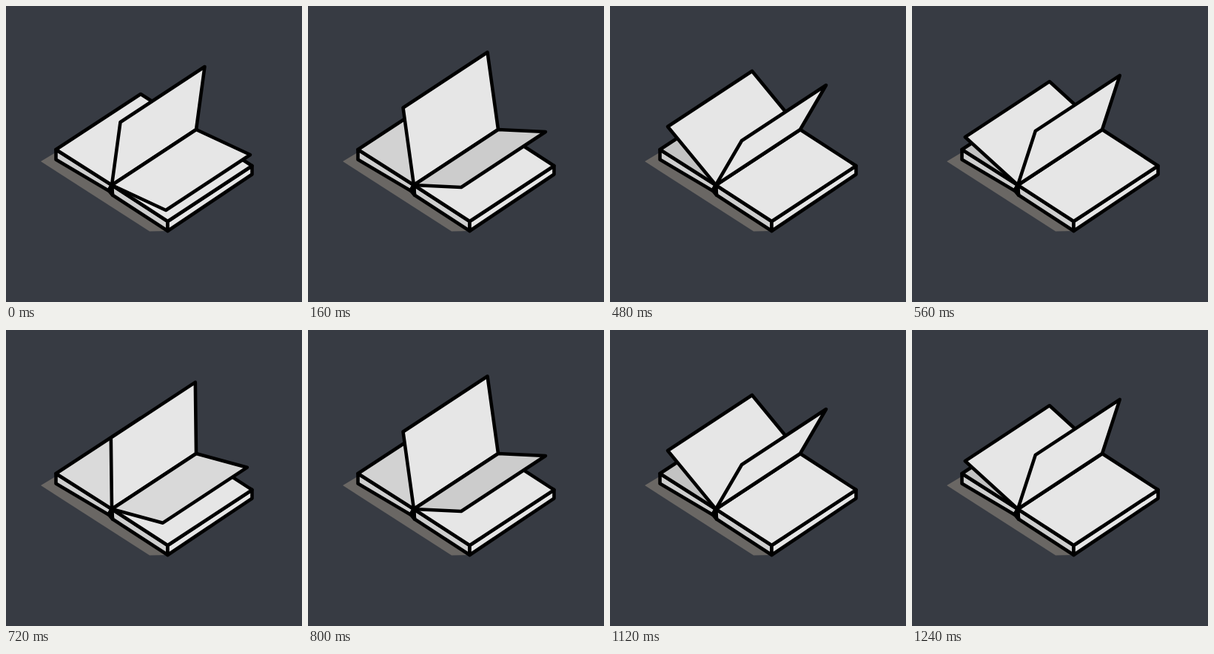
An HTML page for the animation above (1280 ms loop, 400 by 400 pixels).

```html
<!DOCTYPE html>
<html lang="en">
<head>
<meta charset="utf-8">
<title>Flipping book</title>
<style>
  html, body { margin: 0; height: 100%; overflow: hidden; background: #373b43; }
  svg { display: block; width: 100%; height: 100%; }
  .ink { stroke: #000; stroke-width: 4.6; stroke-linejoin: round; fill: #e6e6e6; }
  .side { fill: #cecece; }
</style>
</head>
<body>
<svg viewBox="0 0 400 400">
  <path fill="#6a6764" d="M47 210 67 198 218 304 194 304.500Z"/>
  <g class="ink">
    <path class="side" d="M67.500 194 143 242 138.500 249.500 67.500 207.500Z"/>
    <path class="side" d="M143 242 218.500 291 218.500 304 144 255.500Z"/>
    <path d="M218.500 291 332.500 216 332.500 227.500 218.500 304Z"/>
    <path fill="#000" d="M143 242 138.500 249 144 255.500Z"/>
    <path id="left" d="M67.500 194 182 119 257 167 143 242Z"/>
    <path d="M143 242 257 167 332.500 216 218.500 291Z"/>
    <path id="falling"/>
    <path id="rising"/>
  </g>
</svg>
<script>
const LOOP = 1280, TURN = 640, TICK = 40;

// Free edge relative to the hinge, one point per 160 ms, with one guide point at each end.
const PATH = [
  [78, 64], [73, 34], [64, 3], [52, -30], [35, -60], [11.500, -85],
  [-14.500, -104.500], [-43, -104], [-65, -79], [-75.500, -48], [-81, 0]
];

// Second turn runs with uneven holds, in ticks.
const HOLDS = [0, 0, 2, 2, 4, 5, 6, 6, 8, 8, 10, 11, 12, 12, 13, 14];

const left = document.getElementById('left');
const falling = document.getElementById('falling');
const rising = document.getElementById('rising');

const grey = v => `rgb(${v},${v},${v})`;

function edgeAt(ms) {
  const i = Math.min(Math.floor(ms / 160), PATH.length - 4);
  const u = ms / 160 - i;
  const [p, q, r, s] = PATH.slice(i, i + 4);
  return [0, 1].map(k => q[k] + u / 2 * (r[k] - p[k] + u * (
    2 * p[k] - 5 * q[k] + 4 * r[k] - s[k] + u * (3 * (q[k] - r[k]) + s[k] - p[k]))));
}

function setPage(el, [dx, dy]) {
  el.setAttribute('d', `M143 242 257 167 ${257 + dx} ${167 + dy} ${143 + dx} ${242 + dy}Z`);
}

function phaseAt(t) {
  const tick = Math.floor(t / TICK);
  return TICK * (tick < 16 ? tick & ~1 : HOLDS[tick - 16]);
}

function draw(phase) {
  const edge = edgeAt(phase);
  setPage(rising, edge);
  setPage(falling, edgeAt(phase + TURN));
  const topSeen = 75 * edge[0] + 114 * edge[1] > 0;
  rising.style.fill = grey(topSeen ? Math.round(230 - phase * 0.160) : 230);
  left.style.fill = grey(Math.round(190 + 40 * Math.exp(-phase / 230)));
}

let shown = -1;
function frame(now) {
  const phase = phaseAt(now % LOOP);
  if (phase !== shown) draw(shown = phase);
  requestAnimationFrame(frame);
}
draw(0);
requestAnimationFrame(frame);
</script>
</body>
</html>
```
